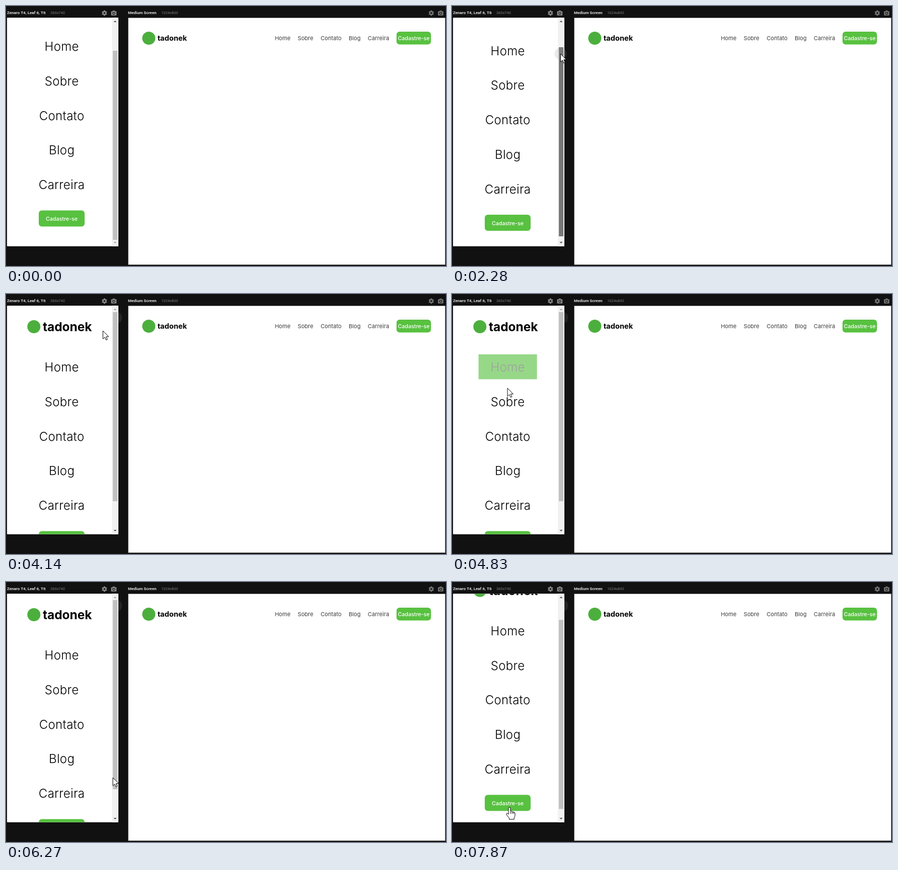
Recreate the animation shown at these times as an HTML page with a canvas. Size 873 by 517 pixels, loop 8 s.

```html
<!DOCTYPE html>
<html lang="pt">
<head>
<meta charset="utf-8">
<title>Menu responsivo</title>
<style>
  html, body { margin: 0; width: 100%; height: 100%; overflow: hidden; background: #111; }
  canvas { display: block; width: 873px; height: 517px; }
</style>
</head>
<body>
<canvas id="stage"></canvas>
<script>
const W = 873, H = 517, LOOP = 8000;
const MAX_SCROLL = 65, THUMB_TRAVEL = 53, ROW = 68.75, ITEM_H = 49.4, MID = 110.6;
const GREEN = '#58c140', LOGO = '#4caf3d';
const LABELS = ['Home', 'Sobre', 'Contato', 'Blog', 'Carreira'];
const ITEM_W = { Home: 116, Sobre: 116, Contato: 139, Blog: 102, Carreira: 142 };

const canvas = document.getElementById('stage');
const ctx = canvas.getContext('2d');
const dpr = window.devicePixelRatio || 1;
canvas.width = W * dpr;
canvas.height = H * dpr;

const clamp = (x, lo = 0, hi = 1) => Math.max(lo, Math.min(hi, x));
const smooth = x => { x = clamp(x); return x * x * (3 - 2 * x); };
const mix = (a, b, p) => a + (b - a) * p;

// Pointer key points: time, x, y
const PATH = [
  [500, 12, 42], [1235, 168, 82], [1340, 184, 70],
  [1750, 215, 102], [2210, 215, 102], [2750, 218, 49], [4000, 218, 49],
  [4560, 116, 145], [4830, 110, 187], [5450, 130, 334], [5720, 141, 398], [5960, 183, 410],
  [6270, 212, 389], [6470, 222, 394], [6930, 222, 394], [7330, 222, 433], [7870, 114, 448]
];

// Thumb drags: press time, release time, scroll when grabbed
const DRAGS = [
  { from: 1950, to: 3080, scroll: MAX_SCROLL },
  { from: 6730, to: 7340, scroll: 0 }
];

const ARROW = new Path2D('M0 0V16.2L3.8 12.7L6.2 18.3L8.8 17.2L6.4 11.7H11.4Z');
const HAND = new Path2D('M-2 1.8Q-2 0 0 0Q2 0 2 1.8V8Q4.2 7 5.3 9Q7.6 8 8.3 10Q11 9.5 11 12V16' +
  'Q11 19 9.2 21V24H-.5V21.5L-5.6 15Q-7 12.6 -5 11.7Q-3.6 11.4 -2 14Z');

function pointerAt(t) {
  const i = PATH.findIndex(key => key[0] > t);
  if (i === 0) return null;
  if (i < 0) return PATH[PATH.length - 1].slice(1);
  const [t0, x0, y0] = PATH[i - 1], [t1, x1, y1] = PATH[i];
  const p = (t - t0) / (t1 - t0);
  return [mix(x0, x1, p), mix(y0, y1, p)];
}

const pressed = t => DRAGS.some(d => t >= d.from && t < d.to);

// The page follows the pointer while the thumb is held
function scrollAt(t) {
  const drag = DRAGS.filter(d => t >= d.from).pop();
  if (!drag) return MAX_SCROLL;
  const dy = pointerAt(Math.min(t, drag.to))[1] - pointerAt(drag.from)[1];
  return clamp(drag.scroll + dy * MAX_SCROLL / THUMB_TRAVEL, 0, MAX_SCROLL);
}

const itemTop = (i, s) => 120 + ROW * i - s;
const buttonTop = s => 471.5 - s;

function overBox(t, width, top, height) {
  const pos = pointerAt(t);
  return !!pos && Math.abs(pos[0] - MID) <= width / 2 && pos[1] >= top && pos[1] <= top + height;
}
const overItem = (t, i) => overBox(t, ITEM_W[LABELS[i]], itemTop(i, scrollAt(t)), ITEM_H);
const overButton = t => overBox(t, 91, buttonTop(scrollAt(t)), 32);
const overBar = t => t >= PATH[0][0] && pointerAt(t)[0] > 212.5;

// Time spans in which a test holds
function spansOf(test) {
  const spans = [];
  let last = null;
  for (let t = 0; t < LOOP; t += 5) {
    if (!test(t)) last = null;
    else if (last) last[1] = t;
    else spans.push(last = [t, t]);
  }
  return spans;
}
const hovers = LABELS.map((_, i) => spansOf(t => overItem(t, i)));

const hoverAmount = (t, i) => Math.max(0, ...hovers[i].map(([a, b]) =>
  smooth((Math.min(t, b) - a) / 220) * (1 - smooth((t - b) / 280))));

function rect(x, y, w, h, color, r = 0) {
  ctx.fillStyle = color;
  ctx.beginPath();
  ctx.roundRect(x, y, w, h, r);
  ctx.fill();
}

function disc(x, y, r, color) {
  ctx.fillStyle = color;
  ctx.beginPath();
  ctx.arc(x, y, r, 0, 7);
  ctx.fill();
}

function text(str, x, y, font, color, spacing = 0, align = 'left') {
  ctx.font = font + ', sans-serif';
  ctx.letterSpacing = spacing + 'px';
  ctx.textAlign = align;
  ctx.fillStyle = color;
  ctx.fillText(str, x, y);
}

function gear(x, y, color) {
  ctx.fillStyle = color;
  for (let i = 0; i < 6; i++) {
    ctx.save();
    ctx.translate(x, y);
    ctx.rotate(i * Math.PI / 3);
    ctx.fillRect(-1.4, -5.3, 2.8, 3);
    ctx.restore();
  }
  disc(x, y, 3.9, color);
  disc(x, y, 1.8, '#111');
}

function camera(x, y, color) {
  rect(x - 5.3, y - 3.6, 10.6, 8.3, color, 1);
  rect(x - 2, y - 5, 4, 2, color, .5);
  disc(x, y + .5, 2.8, '#111');
  disc(x, y + .5, 1.7, color);
}

function heading(x, title, size, sizeX, iconX, color) {
  text(title, x, 16.3, '700 8px Roboto', '#e0e0e0');
  text(size, sizeX, 16.3, '400 7.5px Roboto', '#7c7c7c');
  gear(iconX, 14, color);
  camera(iconX + 18.6, 14, color);
}

function brand(x, y, size, textX, baseline) {
  disc(x, y, 13, LOGO);
  text('tadonek', textX, baseline, `700 ${size}px Inter`, '#000');
}

function signUp(x, y, w, h, baseline) {
  rect(x, y, w, h, GREEN, 6);
  text('Cadastre-se', x + w / 2, baseline, '500 10.7px Inter', '#fff', 0, 'center');
}

function desktop() {
  rect(242, 23, 630, 492, '#707070', 1);
  rect(243, 24, 628, 490, '#fff');
  brand(283.3, 64, 14.6, 300.7, 69);
  let x = 533.4;
  for (const label of LABELS) {
    text(label, x, 68, '400 11px Inter', '#3a3a3a', .05);
    x += ctx.measureText(label).width + 14.4;
  }
  signUp(774.8, 51, 68.4, 25.6, 68);
}

function triangle(x, y, dir, color) {
  ctx.fillStyle = color;
  ctx.beginPath();
  ctx.moveTo(x - 3, y + 1.5 * dir);
  ctx.lineTo(x + 3, y + 1.5 * dir);
  ctx.lineTo(x, y - 1.5 * dir);
  ctx.fill();
}

function scrollbar(t, s) {
  rect(210, 23, 13, 455, '#f1f1f1');
  const color = pressed(t) ? '#787878' : overBar(t) ? '#a8a8a8' : '#c1c1c1';
  rect(212, 36 + s * THUMB_TRAVEL / MAX_SCROLL, 9, 376, color);
  triangle(216.5, 30.5, 1, s > 0 ? '#505050' : '#a3a3a3');
  triangle(216.5, 470.5, -1, s < MAX_SCROLL ? '#505050' : '#a3a3a3');
}

function menuItem(t, i, s) {
  const label = LABELS[i], y = itemTop(i, s), p = hoverAmount(t, i);
  const tone = Math.round(255 * p);
  if (p > 0) {
    ctx.globalAlpha = p;
    rect(MID - ITEM_W[label] / 2, y, ITEM_W[label], ITEM_H, GREEN);
    ctx.globalAlpha = 1;
  }
  text(label, MID, y + 34, '350 24px Inter', `rgb(${tone},${tone},${tone})`, .3, 'center');
}

function phone(t) {
  const s = scrollAt(t);
  ctx.save();
  ctx.beginPath();
  ctx.roundRect(2, 23.3, 221, 454.4, 1);
  ctx.clip();
  rect(2, 23, 221, 455, '#fff');
  brand(55.3, 65 - s, 24.4, 73, 74 - s);
  LABELS.forEach((_, i) => menuItem(t, i, s));
  signUp(65, buttonTop(s), 91, 32, 492 - s);
  scrollbar(t, s);
  ctx.restore();
}

function pointer(t) {
  const pos = pointerAt(t);
  if (!pos) return;
  if (pressed(t)) disc(...pos, 12, 'rgba(150,150,150,.2)');
  const hand = overButton(t) || LABELS.some((_, i) => overItem(t, i));
  const shape = hand ? HAND : ARROW;
  ctx.save();
  ctx.translate(...pos);
  ctx.fillStyle = '#fff';
  ctx.strokeStyle = '#000';
  ctx.lineWidth = 1;
  ctx.lineJoin = 'round';
  ctx.fill(shape);
  ctx.stroke(shape);
  if (hand) {
    ctx.beginPath();
    for (const x of [2, 5.3, 8.3]) {
      ctx.moveTo(x, 9);
      ctx.lineTo(x, 13);
    }
    ctx.stroke();
  }
  ctx.restore();
}

function draw(t) {
  ctx.setTransform(dpr, 0, 0, dpr, 0, 0);
  rect(0, 0, W, H, '#111');
  heading(2, 'Zenaro T4, Leaf 6, T6', '360x740', 88, 195.3, '#8c8c8c');
  heading(242, 'Medium Screen', '1024x800', 308, 843.8, '#777');
  desktop();
  // Press mark that stays beside the phone
  if (t >= 2750) disc(219, 47, 11.5, '#242424');
  phone(t);
  pointer(t);
}

const start = performance.now();
function tick() {
  draw((performance.now() - start) % LOOP);
  requestAnimationFrame(tick);
}
tick();
</script>
</body>
</html>
```
